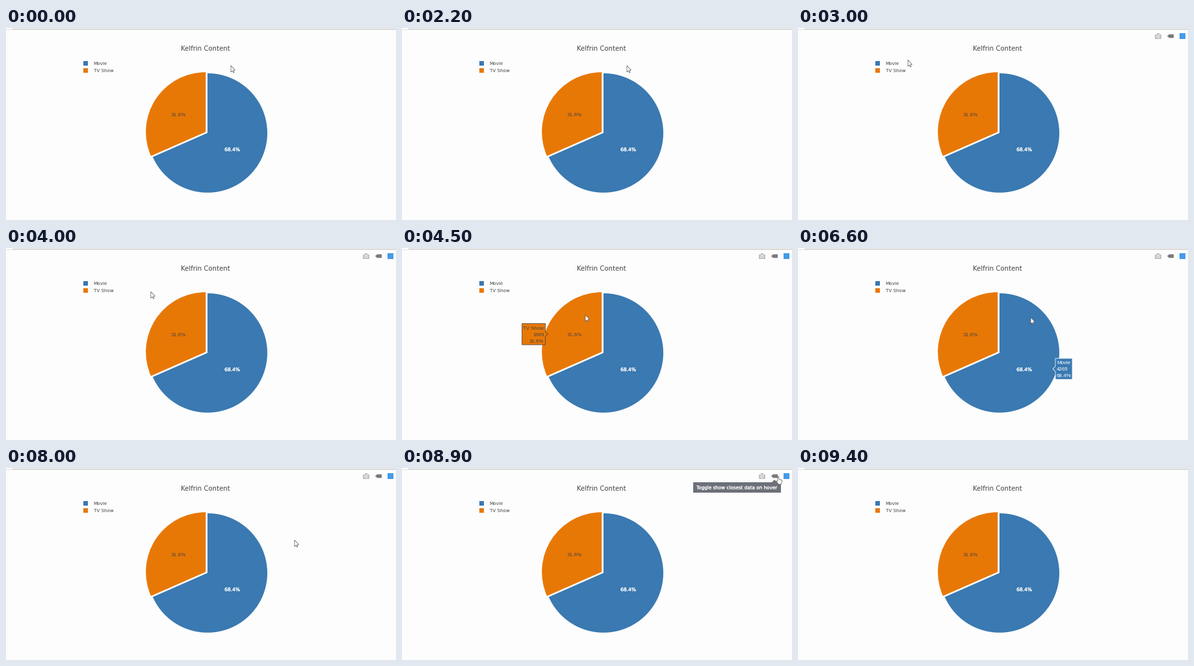
Write a matplotlib script that moves like this. It is 600x296 px and loops after 9900 ms.

```python
import numpy as np
import matplotlib.pyplot as plt
from matplotlib.animation import FuncAnimation
from matplotlib.patches import Circle, Polygon, Rectangle, Wedge
from matplotlib.patheffects import Normal, Stroke
from matplotlib.transforms import Affine2D

W, H, DPI = 600, 296, 100
STEP, LOOP = 100, 9900
PX = 72 / DPI

PAPER, BLUE, ORANGE, INK = "#fdfdfd", "#3a79b1", "#e87806", "#444444"
RADIUS, SHARE = 92, 0.316
MOVIE_CENTER, SHOW_CENTER = (310, 161.8), (307.2, 160.2)

# Pointer strokes: start ms, end ms, bend point, resting point
START = (346, 58)
STROKES = [
    (2600, 3600, (54, 39), (205, 61)),
    (3900, 4500, (250, 75), (282, 103)),
    (5500, 6400, (440, -9), (358, 107)),
    (7600, 8100, (392, 63), (462, 126)),
    (8600, 8900, (540, 60), (577, 13)),
    (9000, 9100, (582, 7), (588, 1)),
]

fig = plt.figure(figsize=(W / DPI, H / DPI), dpi=DPI, facecolor=PAPER)
ax = fig.add_axes([0, 0, 1, 1])
ax.set(xlim=(0, W), ylim=(H, 0))
ax.axis("off")


def add(patch):
    return ax.add_patch(patch)


def box(x, y, width, height, color, z=1):
    return add(Rectangle((x, y), width, height, fc=color, ec="none", zorder=z))


def shape(points, color, z=1, edge="none", lw=0.0):
    return add(Polygon(points, fc=color, ec=edge, lw=lw * PX, zorder=z))


def disc(x, y, radius, color, z):
    return add(Circle((x, y), radius, fc=color, ec="none", zorder=z))


def label(x, y, text, size, color=INK, ha="left", font="DejaVu Sans", z=2, weight=0.0):
    item = ax.text(x, y, text, size=size * PX, color=color, ha=ha,
                   va="baseline", family=font, zorder=z)
    if weight:
        item.set_path_effects([Stroke(linewidth=weight * PX, foreground=color), Normal()])
    return item


def draw_chart():
    for row, color in enumerate(("#c4c4c4", "#e8e8e8", "#f7f7f7")):
        box(0 if row else 10, row + 1, W, 1, color)
    label(307, 34.8, "Kelfrin Content", 10.1, ha="center")
    for y, name, color in ((51, "Movie", BLUE), (62, "TV Show", ORANGE)):
        box(119, y, 7, 7, color)
        label(134.7, y + 6.2, name, 7.2)
    # The y axis points down, so -90 degrees is the top.
    split = 270 - 360 * SHARE
    add(Wedge(MOVIE_CENTER, RADIUS, -90, split, fc=BLUE, ec="none"))
    add(Wedge(SHOW_CENTER, RADIUS, split, 270, fc=ORANGE, ec="none"))
    label(265, 135.8, "31.6%", 7.5, ha="center")
    label(348, 189.9, "68.4%", 7.5, "white", ha="center", weight=0.25)


def hover_label(tip, y, width, side, lines, fill, ink):
    """Callout whose arrow tip sits at (tip, y); side is -1 for left, 1 for right."""
    near, far = tip + 4 * side, tip + (4 + width) * side
    top, bottom = y - 16.3, y + 16.3
    outline = [(tip, y), (near, y - 4), (near, top), (far, top),
               (far, bottom), (near, bottom), (near, y + 4)]
    align = "right" if side < 0 else "left"
    return [shape(outline, fill, 5, ink, 0.8)] + [
        label(near + 2 * side, y - 7.1 + 10 * i, text, 7.9, ink, align, "Liberation Sans", 6)
        for i, text in enumerate(lines)
    ]


def draw_modebar():
    pale = "#c2c2c2"
    camera = [box(549, 9.5, 10, 7, pale), box(552, 8.2, 4, 2, pale),
              disc(554, 12.9, 2.4, PAPER, 2), disc(554, 12.9, 1.5, pale, 3)]
    tag = [shape([(568, 12.5), (571, 9.7), (578, 9.7), (578, 15.3), (571, 15.3)], "#7a7a7a")]
    badge = [box(587, 8, 9, 9, "#459be8")]
    return camera + tag + badge


def draw_tooltip():
    slate = "#6c7079"
    return [
        box(448, 22, 135, 16, slate, 5),
        shape([(569, 22), (573, 18), (577, 22)], slate, 5),
        label(453, 32.6, "Toggle show closest data on hover", 7.2, "white", z=6, weight=0.15),
    ]


draw_chart()
modebar = draw_modebar()
tooltip = draw_tooltip()
callouts = {
    "show": hover_label(224.4, 132.8, 35.7, -1, ("TV Show", "1969", "31.6%"), ORANGE, INK),
    "movie": hover_label(392, 186.4, 26, 1, ("Movie", "4265", "68.4%"), BLUE, "white"),
}
arrow = shape([(0, 0), (0, 10), (2.2, 8), (4, 11), (5, 10.5), (3.8, 7.3), (6.5, 7)],
              "white", 9, "#505050", 0.7)
hand = shape([(1, 0), (2.5, 0), (3, 4), (8, 6), (6.5, 12), (2, 12), (-1.5, 7), (1, 7)],
             "white", 9, "#505050", 0.7)


def pointer_at(t):
    here = np.array(START, float)
    for begin, end, bend, rest in STROKES:
        if t <= begin:
            break
        left = (1 - min((t - begin) / (end - begin), 1)) ** 1.25
        u = 1 - left
        here = left**2 * here + 2 * left * u * np.array(bend) + u**2 * np.array(rest)
    return here


def hovered_slice(x, y):
    turn = np.degrees(np.arctan2(SHOW_CENTER[0] - x, SHOW_CENTER[1] - y)) % 360
    name, center = (("show", SHOW_CENTER) if turn < 360 * SHARE
                    else ("movie", MOVIE_CENTER))
    return name if np.hypot(x - center[0], y - center[1]) < RADIUS else None


def show(parts, visible):
    for part in parts:
        part.set_visible(visible)


def update(frame):
    t = frame * STEP
    x, y = pointer_at(t)
    present = t <= STROKES[-1][1]
    on_tag = present and 567 < x < 580 and y < 18

    for pointer, visible in ((arrow, present and not on_tag), (hand, on_tag)):
        pointer.set_transform(Affine2D().translate(x, y) + ax.transData)
        pointer.set_visible(visible)

    active = hovered_slice(x, y)
    for name, parts in callouts.items():
        show(parts, name == active)
    show(tooltip, on_tag)

    # The toolbar fades in on the first move and out once the pointer has left.
    opacity = np.clip(min(t - 2600, 9400 - t) / 300, 0, 1)
    for part in modebar:
        part.set_alpha(opacity)
    return [arrow, hand]


anim = FuncAnimation(fig, update, frames=LOOP // STEP, interval=STEP,
                     repeat=True, repeat_delay=0, blit=False)
plt.show()
```
